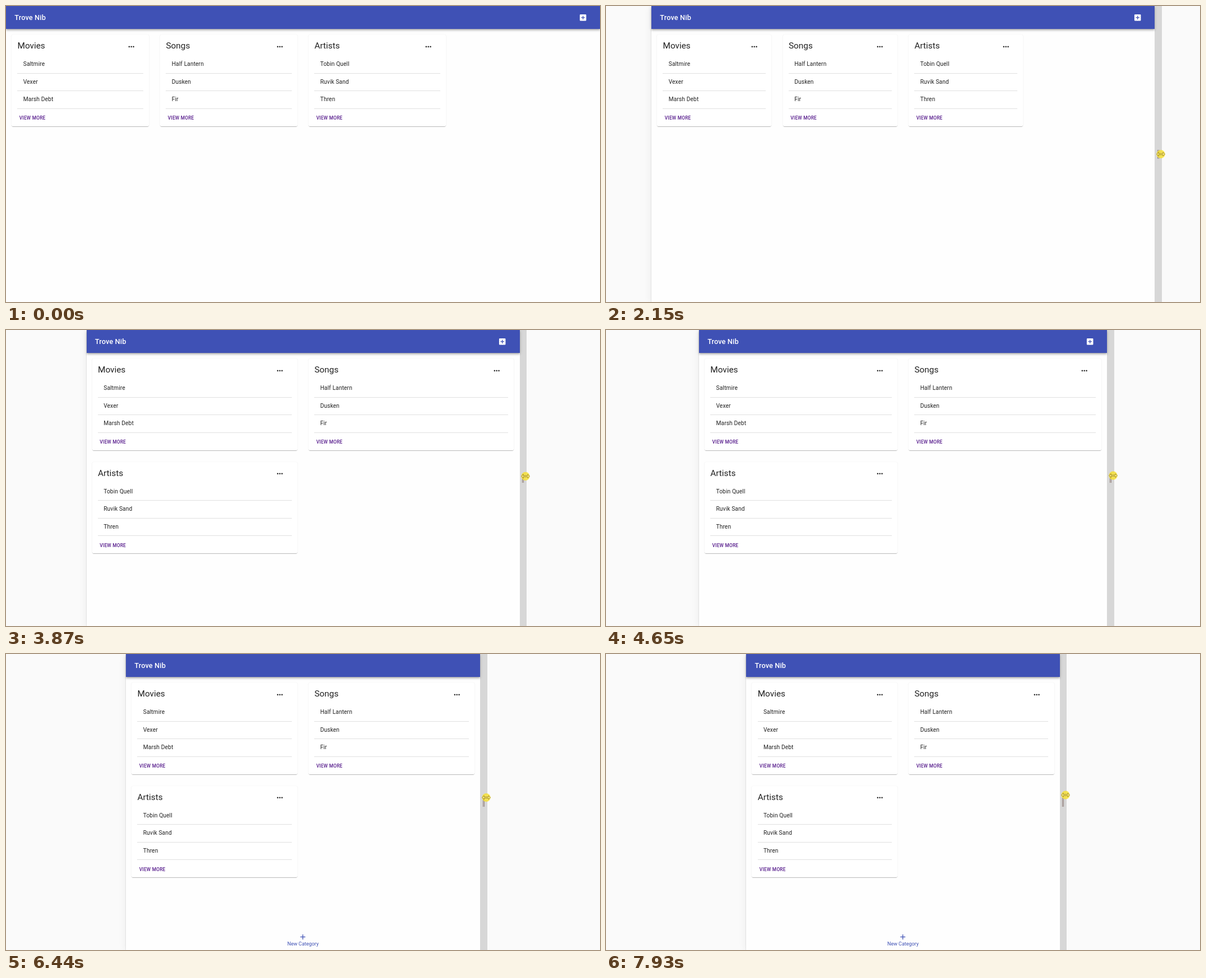
Animation, 1060 px wide and 529 px high, one loop 8000 ms. Source, as an HTML page:

```html
<!DOCTYPE html>
<html lang="en">
<head>
<meta charset="utf-8">
<title>Responsive list board</title>
<style>
  html, body { margin: 0; width: 100%; height: 100%; overflow: hidden; }
  body { background: #fafafa; font-family: Roboto, sans-serif; color: rgba(0, 0, 0, .87); }
  #stage { position: relative; width: 1060px; height: 529px; overflow: hidden; --left: 0px; --cols: 4; }
  #page { position: absolute; inset: 0 var(--left); background: #fefefe; }
  .framed #page { box-shadow: 0 0 1px rgba(0, 0, 0, .35), 0 2px 14px rgba(0, 0, 0, .07); }

  header {
    position: absolute; inset: 0 0 auto; height: 40.96px; z-index: 1;
    background: #3f51b5; color: #fff;
    box-shadow: 0 1.3px 2.6px -.6px rgba(0, 0, 0, .2), 0 2.6px 3.2px rgba(0, 0, 0, .14), 0 .6px 6.4px rgba(0, 0, 0, .12);
  }
  h1 { margin: 0; padding-left: 15.36px; font: 500 12.8px/41px Roboto, sans-serif; letter-spacing: .0075em; }
  svg { position: absolute; width: 15.36px; height: 15.36px; fill: currentColor; }
  header svg { right: 23.04px; top: 12.8px; }

  main {
    position: absolute; inset: 40.96px 0 auto; display: grid;
    grid-template-columns: repeat(var(--cols), 1fr); grid-auto-rows: 184.32px;
  }
  .cell { padding: 10.24px; }
  .card {
    position: relative; height: 163.84px; background: #fff; border-radius: 2.56px;
    box-shadow: 0 1.3px .6px -.6px rgba(0, 0, 0, .2), 0 .6px .6px rgba(0, 0, 0, .14), 0 .6px 1.9px rgba(0, 0, 0, .12);
  }
  .card svg { right: 23.04px; top: 13.6px; }
  h2 { position: absolute; left: 10.24px; top: 10px; margin: 0; font: 400 15.36px/20.5px Roboto, sans-serif; }
  ul { position: absolute; inset: 38.3px 10.24px auto; margin: 0; padding: 0; list-style: none; }
  li {
    box-sizing: border-box; height: 31.36px; padding-left: 10.24px; border-bottom: 1px solid #e0e0e0;
    font-size: 10.24px; line-height: 30.6px; letter-spacing: .00938em;
  }
  .more {
    position: absolute; left: 13.44px; top: 139px; color: #551a8b;
    font: 500 8.32px/20px Roboto, sans-serif; letter-spacing: .02857em;
  }

  #nav {
    position: absolute; inset: auto 0 0; height: 35.84px; display: none;
    background: #fefefe; color: #3f51b5; text-align: center; font-size: 8.96px; line-height: 12px;
  }
  #nav svg { left: calc(50% - 7.68px); top: 4.4px; }
  #nav span { display: block; margin-top: 19px; }
  .compact #nav { display: block; }
  .compact header svg { display: none; }

  #grip, #cursor { position: absolute; display: none; }
  .framed #grip, .framed #cursor { display: block; }
  #grip { left: calc(1060px - var(--left)); top: 0; width: 12.6px; height: 529px; background: #d7d7d7; }
  #grip::after {
    content: ""; position: absolute; left: 4.6px; top: 257px; width: 1px; height: 16px;
    border: solid #8f7c78; border-width: 0 1px;
  }
  #cursor { left: calc(1062.5px - var(--left)); top: -8px; width: 16px; height: 16px; overflow: visible; }
</style>
</head>
<body>
<div id="stage">
  <div id="page">
    <header>
      <h1>Trove Nib</h1>
      <svg viewBox="0 0 24 24"><path d="M19 3H5a2 2 0 0 0-2 2v14a2 2 0 0 0 2 2h14a2 2 0 0 0 2-2V5a2 2 0 0 0-2-2zm-2 10h-4v4h-2v-4H7v-2h4V7h2v4h4z"/></svg>
    </header>
    <main></main>
    <div id="nav">
      <svg viewBox="0 0 24 24"><path d="M19 13h-6v6h-2v-6H5v-2h6V5h2v6h6z"/></svg>
      <span>New Category</span>
    </div>
  </div>
  <div id="grip"></div>
  <svg id="cursor" viewBox="-8 -8 16 16">
    <circle r="7.6" fill="#f7e12e" fill-opacity=".8"/>
    <path d="M-7.5 0L-3.8-3.4V-1H3.8V-3.4L7.5 0 3.8 3.4V1H-3.8V3.4z" fill="#fdf3a0" fill-opacity=".6" stroke="#927914" stroke-width=".8"/>
  </svg>
</div>
<script>
  const lists = {
    Movies: ['Saltmire', 'Vexer', 'Marsh Debt'],
    Songs: ['Half Lantern', 'Dusken', 'Fir'],
    Artists: ['Tobin Quell', 'Ruvik Sand', 'Thren'],
  };
  const dots = '<svg viewBox="0 0 24 24"><circle cx="6" cy="12" r="2"/><circle cx="12" cy="12" r="2"/><circle cx="18" cy="12" r="2"/></svg>';
  document.querySelector('main').innerHTML = Object.entries(lists).map(([name, items]) =>
    `<div class="cell"><section class="card"><h2>${name}</h2>${dots}
      <ul>${items.map(item => `<li>${item}</li>`).join('')}</ul>
      <span class="more">VIEW MORE</span></section></div>`).join('');

  const LOOP = 8000, START = 500, TICK = 78.2, SCALE = .64;
  // [tick, value] pairs
  const leftKeys = [[0, 1], [10, 36.5], [21, 81], [32, 120], [43, 143.5], [54, 168], [65, 188],
                    [76, 214], [78, 217], [79, 217], [90, 237], [95, 250.2]];
  const cursorKeys = [[0, 267], [10, 266.5], [32, 263], [43, 261.3], [64, 259], [76, 256.5], [95, 252]];

  function sample(keys, n) {
    const i = Math.max(1, keys.findIndex(key => key[0] >= n));
    const [n0, v0] = keys[i - 1], [n1, v1] = keys[i];
    return v0 + (v1 - v0) * (n - n0) / (n1 - n0);
  }

  const stage = document.getElementById('stage');
  const cursor = document.getElementById('cursor');

  function draw(t) {
    const framed = t >= START;
    const tick = Math.min(95, Math.max(0, Math.floor((t - START) / TICK + .05)));
    const left = framed ? sample(leftKeys, tick) : 0;
    const viewport = (1060 - 2 * left) / SCALE;
    stage.style.setProperty('--left', left + 'px');
    stage.style.setProperty('--cols', viewport >= 1280 ? 4 : 2);
    stage.classList.toggle('framed', framed);
    stage.classList.toggle('compact', viewport < 1024);
    cursor.style.transform = `translateY(${sample(cursorKeys, tick)}px)`;
  }

  const origin = performance.now();
  function loop() {
    draw((performance.now() - origin) % LOOP);
    requestAnimationFrame(loop);
  }
  loop();
</script>
</body>
</html>
```
